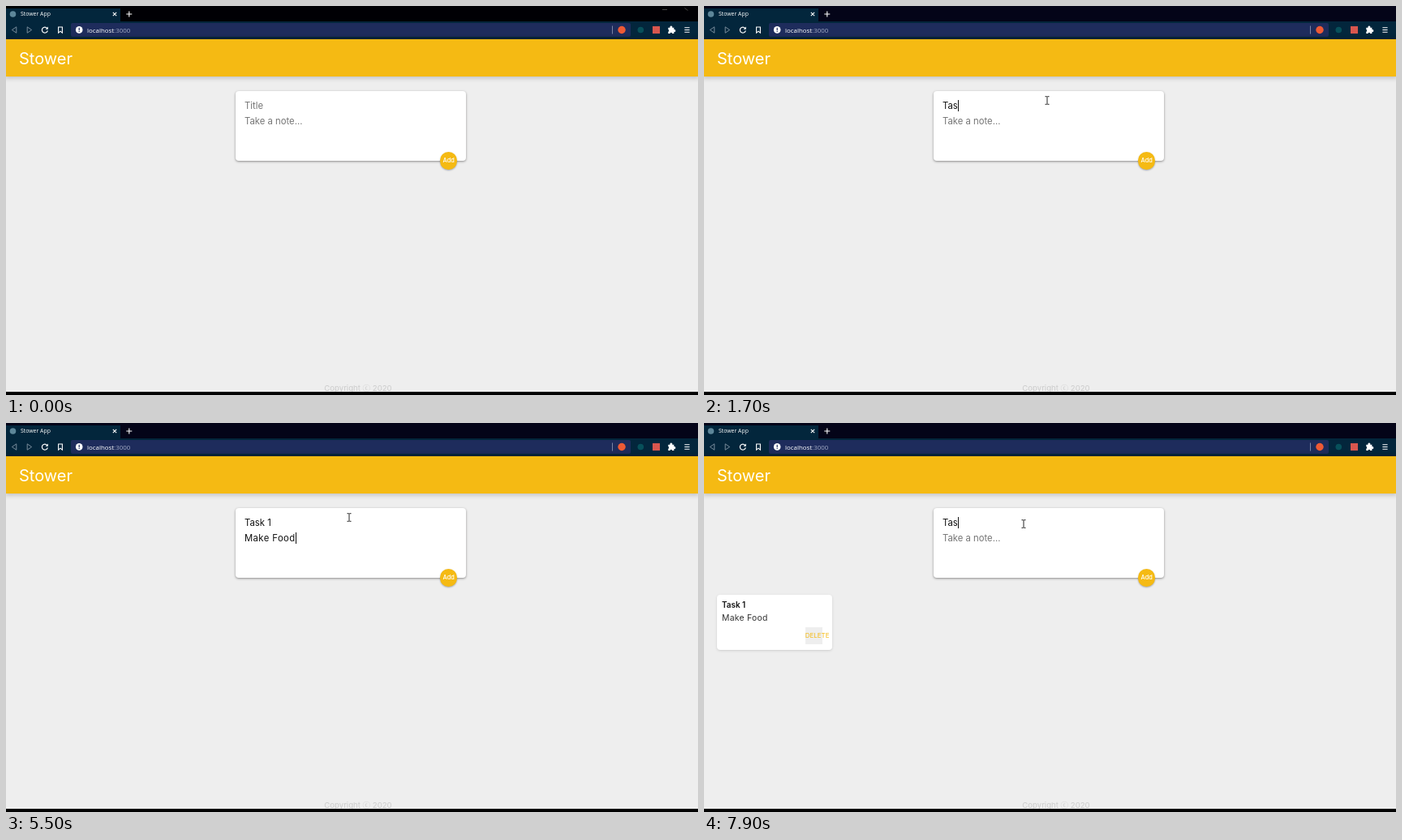
Write an HTML page that moves like this. It is 853 px wide and 480 px high and loops after 8000 ms.

```html
<!DOCTYPE html>
<html lang="en">
<head>
<meta charset="utf-8">
<title>Stower App</title>
<style>
  html, body { margin: 0; width: 100%; height: 100%; overflow: hidden; background: #000; }
  #stage { position: relative; width: 853px; height: 480px; overflow: hidden; background: #eee; font-family: Inter, sans-serif; }
  #stage > *, .card > * { position: absolute; box-sizing: border-box; white-space: pre; }
  .tabs { left: 0; top: 0; width: 853px; height: 20px; background: #000004; }
  .tab { left: 0; top: 3px; width: 141px; height: 17px; background: #03263c; }
  .tools { left: 0; top: 19px; width: 853px; height: 22px; background: #03263c; }
  .field { left: 80px; top: 21px; width: 690px; height: 17px; border-radius: 2px; background: #1e2c5c; }
  .ui { color: #fff; font-family: "Open Sans", sans-serif; line-height: 14px; }
  .tabname { left: 18px; top: 3px; font-size: 6.9px; }
  .url { left: 100px; top: 22.5px; font-size: 7.9px; }
  .url span { color: #a3abc4; }
  .head { left: 0; top: 41px; width: 853px; height: 46px; background: #f5ba13; box-shadow: 0 0 6px 2px rgba(0,0,0,.2); }
  .chrome { left: 0; top: 0; }
  .brand { left: 16px; top: 50px; color: #fff; font-size: 20px; line-height: 30px; }
  .card { background: #fff; border-radius: 4px; }
  .form { left: 283px; top: 104.5px; width: 284px; height: 86.5px; box-shadow: 0 1px 3px #8a8989; }
  .line { left: 11px; display: flex; align-items: center; height: 15px; font-size: 11.3px; line-height: 15px; color: #111; }
  .line i { width: 1px; height: 14px; margin-right: -1px; background: #111; }
  .line em { font-style: normal; color: #757575; letter-spacing: 0; }
  .body { letter-spacing: .4px; }
  .add { left: 535px; top: 180.3px; width: 21.3px; height: 21.3px; border-radius: 50%; background: #f5ba13; color: #fff;
    font-size: 7.4px; font-weight: 500; line-height: 21.3px; text-align: center; box-shadow: 0 1px 2px rgba(0,0,0,.3); }
  .note { left: 16px; top: 212px; width: 142px; height: 67.5px; box-shadow: 0 1px 3px #ccc; }
  .note b { left: 6px; top: 5px; font-size: 9.9px; font-weight: 600; line-height: 15px; color: #111; }
  .note p { left: 6px; top: 21px; margin: 0; font-size: 10.4px; letter-spacing: .28px; line-height: 15px; color: #333; }
  .del { left: 108.7px; top: 40px; width: 21.3px; height: 21.3px; background: #eee; color: #f5ba13; font-size: 8px; line-height: 21.3px; }
  .foot { left: 334px; width: 200px; top: 465px; text-align: center; color: #ccc; font-size: 9.6px; line-height: 14px;
    font-family: Inter, "Noto Sans CJK JP", "Noto Sans CJK SC", "DejaVu Sans", sans-serif; }
  .base { left: 0; top: 476px; width: 853px; height: 4px; background: #000; }
</style>
</head>
<body>
<div id="stage">
  <div class="tabs" id="tabs"></div>
  <div class="tab"></div>
  <div class="tools"></div>
  <div class="field"></div>
  <div class="head"></div>
  <svg class="chrome" width="853" height="41" fill="none" stroke="#fff">
    <circle cx="8.5" cy="10" r="3.8" fill="#5d8699" stroke="none"/>
    <path d="M131.8 7.8l4.4 4.4m0-4.4l-4.4 4.4M148.3 10h7m-3.5-3.5v7" stroke-width="1.1"/>
    <path id="win" d="M809 4.5h6M836.5 2.5l4 3" stroke="#555" stroke-width=".8"/>
    <path d="M12.8 25.8v7.4l-5.4-3.7zM26.2 25.8v7.4l5.4-3.7z" stroke="#8597a5" stroke-width=".9"/>
    <path d="M50.6 27.4a3.5 3.5 0 1 0 .7 3" stroke-width="1.2"/>
    <path d="M51.8 25.6v3.2h-3.2z" fill="#fff" stroke="none"/>
    <path d="M64.6 26h4.8v7.2l-2.4-2-2.4 2z" stroke-width="1.1"/>
    <circle cx="90.2" cy="29.4" r="4.3" fill="#fff" stroke="none"/>
    <path d="M90.2 26.8v3.1m0 .9v1.2" stroke="#1e2c5c" stroke-width="1.2"/>
    <path d="M747.5 24.5v10" stroke="#8790ad" stroke-width=".9"/>
    <g stroke="none">
      <circle cx="759" cy="29.5" r="4.7" fill="#ee5a35"/>
      <circle cx="782.3" cy="29.5" r="3.8" fill="#07505a"/>
      <rect x="797" y="25" width="9" height="9" fill="#d8564e"/>
      <path fill="#fff" d="M816.3 26.8h2.3a1.5 1.5 0 1 1 2.6 0h2.2v2.3a1.4 1.4 0 1 1 0 2.6v2.2h-2.2a1.4 1.4 0 0 0-2.7 0h-2.2v-2.2a1.4 1.4 0 0 0 0-2.6z"/>
    </g>
    <path d="M836.4 26.7h6.2m-6.2 2.8h6.2m-6.2 2.8h6.2" stroke-width="1.1"/>
  </svg>
  <div class="ui tabname">Stower App</div>
  <div class="ui url">localhost<span>:3000</span></div>
  <div class="brand">Stower</div>
  <div class="card form">
    <div class="line" id="title" style="top:11px"><span></span><i></i><em>Title</em></div>
    <div class="line body" id="body" style="top:30px"><span></span><i></i><em>Take a note...</em></div>
  </div>
  <div class="add">Add</div>
  <div class="card note" id="note">
    <b>Task 1</b>
    <p>Make Food</p>
    <div class="del">DELETE</div>
  </div>
  <div class="foot">Copyright ⓒ 2020</div>
  <div class="base"></div>
  <svg id="mouse" width="24" height="24" style="left:0;top:0;overflow:visible">
    <path id="beam" d="M-2.5-4.8h1.8l.7.6.7-.6h1.8M0-4.2v8.4M-2.5 4.8h1.8l.7-.6.7.6h1.8" fill="none" stroke="#222" stroke-width="1"/>
    <path id="arrow" d="M0 0v10.5l2.5-2.3 1.7 3.8 1.5-.7-1.7-3.7h3.3z" fill="#fff" stroke="#000" stroke-width=".8"/>
    <path id="hand" d="M-2.2-6.2q1-1.1 1.9 0v3.6q1-.7 1.7.2q1-.6 1.6.3q1.4-.5 1.6.9v3.3q0 1.5-1 2.6v1.7h-5v-1.5q-1.4-1.3-2.8-4.3q-.3-1.5 1-1.3l1 1.2z" fill="#fff" stroke="#000" stroke-width=".9" stroke-linejoin="round"/>
  </svg>
</div>
<script>
const LOOP = 8000, STEP = 100;
const $ = id => document.getElementById(id);

// [time, value] pairs: each value holds until the next
const titleText = [[0, ""], [1400, "T"], [1500, "Ta"], [1700, "Tas"], [1800, "Task"], [1900, "Task "],
  [2300, "Task 1"], [6500, ""], [7700, "T"], [7800, "Ta"], [7900, "Tas"]];
const bodyText = [[0, ""], [4300, "M"], [4500, "Ma"], [4600, "Mak"], [4700, "Make "], [5000, "Make F"],
  [5200, "Make Fo"], [5300, "Make Foo"], [5500, "Make Food"], [6500, ""]];
const caret = [[0, ""], [1000, "title"], [2900, ""], [3100, "title"], [3500, "body"], [4000, ""],
  [4300, "body"], [6000, ""], [7300, "title"]];

// pointer moves: start, end, from, to
const moves = [
  [100, 800, [560, 403], [423, 116.5]],
  [5800, 6400, [423, 116.5], [549, 197]],
  [6700, 7300, [549, 197], [394, 124.5]]
];

const at = (list, t) => list.filter(k => k[0] <= t).pop()[1];
const show = (el, on) => { el.style.visibility = on ? "visible" : "hidden"; };

function pointer(t) {
  const [t0, t1, a, b] = moves.filter(m => m[0] <= t).pop() || moves[0];
  const p = Math.min(1, Math.max(0, (t - t0) / (t1 - t0)));
  const e = p * p * (3 - 2 * p);
  return a.map((v, i) => v + (b[i] - v) * e);
}

function setLine(id, text, focus) {
  const [span, bar, hint] = $(id).children;
  span.textContent = text;
  show(bar, focus === id);
  hint.style.display = text ? "none" : "";
}

function draw(t) {
  const focus = at(caret, t);
  setLine("title", at(titleText, t), focus);
  setLine("body", at(bodyText, t), focus);
  show($("note"), t >= 6500);
  show($("win"), t < 900);
  $("tabs").style.background = t < 900 ? "#000004" : "#040418";

  const [x, y] = pointer(t);
  const onAdd = Math.hypot(x - 546, y - 191) < 11;
  const onForm = x > 283 && x < 567 && y > 104 && y < 191;
  const kind = onAdd ? "hand" : onForm ? "beam" : "arrow";
  for (const id of ["beam", "arrow", "hand"]) show($(id), t >= 100 && id === kind);
  $("mouse").style.transform = `translate(${x}px, ${y}px)`;
}

const start = performance.now();
function tick() {
  const t = (performance.now() - start) % LOOP;
  draw(Math.floor(t / STEP) * STEP);
  requestAnimationFrame(tick);
}
draw(0);
requestAnimationFrame(tick);
</script>
</body>
</html>
```
